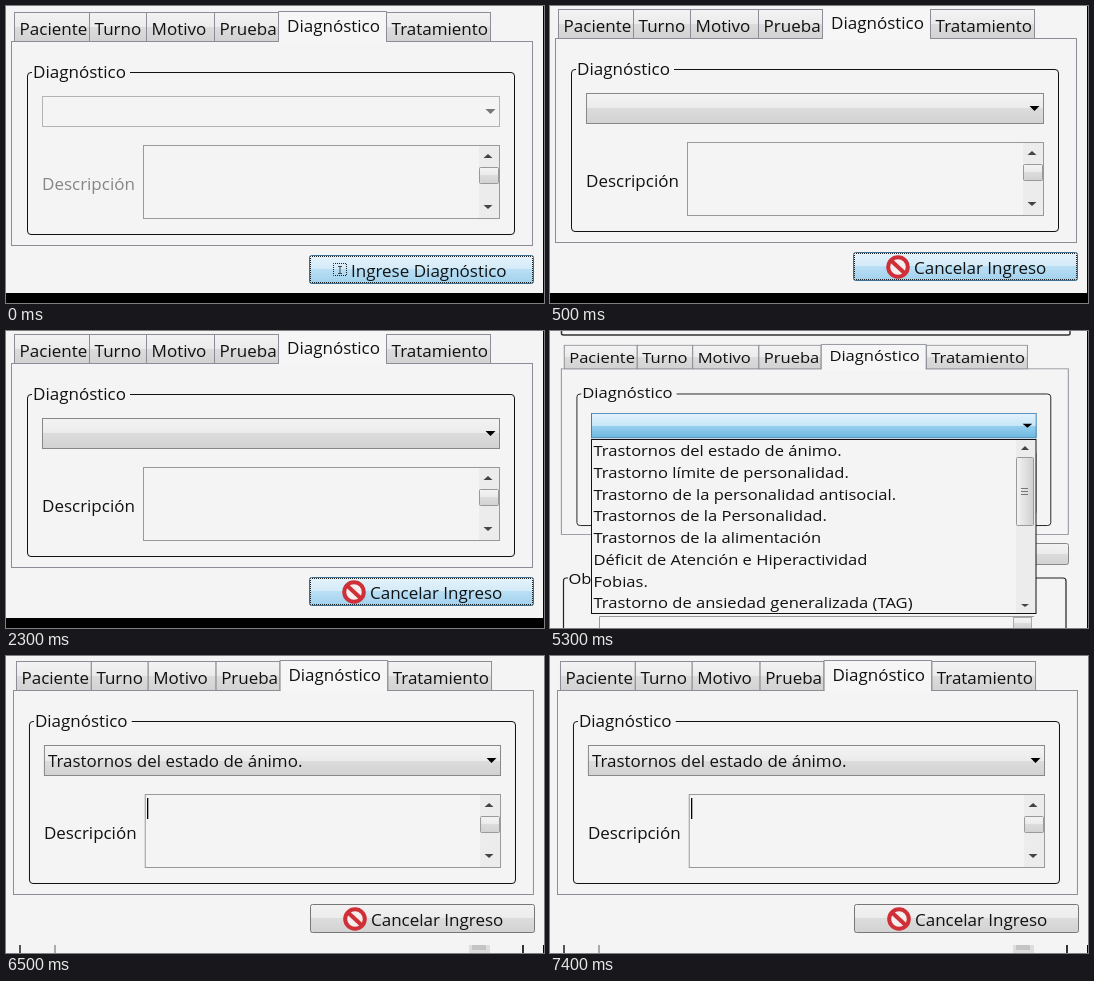
These frames come from a looping animation (538 by 297 pixels, 8000 ms). An HTML page:

```html
<!DOCTYPE html>
<html lang="es">
<head>
<meta charset="utf-8">
<style>
html, body { margin: 0; width: 100%; height: 100%; overflow: hidden; background: #f4f4f4; }
svg { display: block; width: 538px; height: 297px; }
text { font: 17px "Open Sans", "Noto Sans", sans-serif; white-space: pre; }
</style>
</head>
<body>
<svg id="stage" viewBox="0 0 538 297"></svg>
<script>
const stage = document.getElementById('stage');
const BG = '#f4f4f4';

const box = (x, y, w, h, fill, stroke = 'none', r = 0) =>
  `<rect x="${x}" y="${y}" width="${w}" height="${h}" rx="${r}" fill="${fill}" stroke="${stroke}"/>`;
const dotted = (x, y, w, h) =>
  `<rect x="${x}" y="${y}" width="${w}" height="${h}" fill="none" stroke="#222" stroke-dasharray="1" stroke-dashoffset=".5"/>`;
const path = (d, stroke, width = 1) =>
  `<path d="${d}" fill="none" stroke="${stroke}" stroke-width="${width}"/>`;
const label = (x, y, s, fill = '#111') => `<text x="${x}" y="${y}" fill="${fill}">${s}</text>`;
const arrow = (x, y, w, h, fill = '#444') => `<path d="M${x - w} ${y}h${2 * w}l${-w} ${h}z" fill="${fill}"/>`;
const group = (transform, ...parts) => `<g transform="${transform}">${parts.join('')}</g>`;
const gradient = (id, ...colors) => `<linearGradient id="${id}" x2="0" y2="1">${
  colors.map((c, i) => `<stop offset="${[0, .5, .5, 1][i]}" stop-color="${c}"/>`).join('')}</linearGradient>`;

const tabs = [['Paciente', 8, 83], ['Turno', 83, 140], ['Motivo', 140, 208],
  ['Prueba', 208, 272], ['Tratamiento', 380, 484]];

const tabBar = edgeColor =>
  box(5.5, 35.5, 521, 204, BG, '#8b8e96') +
  tabs.map(([name, x, end]) => box(x + .5, 6.5, end - x, 29, 'url(#gray)', '#8b8e96') +
    label(x + 5.6, 28.6, name)).join('') +
  box(273, 5, 107, 32, '#f6f6f6') + path('M272.5 36V5.5H380.5V36', edgeColor) +
  label(281, 26, 'Diagnóstico');

const scrollBar = () =>
  box(473, 140, 20, 72, '#ececec') + arrow(482, 152, 4.5, -4) + arrow(482, 199, 4.5, 4) +
  box(473.5, 161.5, 19, 16, 'url(#gray)', '#999', 1);

function form({ combo, border, disabled, value = '', tabEdge = '#8b8e96' }) {
  const ink = disabled ? '#858585' : '#111';
  return tabBar(tabEdge) +
    path('M26 66.5h-1q-3.5 0-3.5 3.5V225q0 3.5 3.5 3.5H505q3.5 0 3.5-3.5V70q0-3.5-3.5-3.5H124', '#111') +
    label(27, 72, 'Diagnóstico') +
    box(36.5, 90.5, 457, 30, combo, border) +
    arrow(484.5, 103, 5, 5, disabled ? '#777' : '#000') + label(40, 112.5, value) +
    label(36, 184, 'Descripción', ink) +
    box(137.5, 139.5, 356, 73, BG, '#999') + scrollBar();
}

const button = (fill, border, focused) =>
  box(303.5, 249.5, 224, 28, fill, border, 2) + (focused ? dotted(304.5, 250.5, 222, 26) : '');

const insertFace = () =>
  dotted(327.5, 257.5, 13, 12) +
  path('M332 260.5h4M334 260.5v7M332 267.5h4', '#444') + label(345, 271, 'Ingrese Diagnóstico');
const cancelFace = () =>
  `<circle cx="348" cy="264" r="9.5" fill="#f6eeee"/>` +
  path('M341 257.5l14 13', '#cf2f36', 4) +
  `<circle cx="348" cy="264" r="9.8" fill="none" stroke="#cf2f36" stroke-width="4"/>` +
  label(364, 271, 'Cancelar Ingreso');

const bottomBar = box(0, 287, 538, 10, '#000');
const edge = box(537, 0, 1, 297, '#000');

const options = ['Trastornos del estado de ánimo.', 'Trastorno límite de personalidad.',
  'Trastorno de la personalidad antisocial.', 'Trastornos de la Personalidad.',
  'Trastornos de la alimentación', 'Déficit de Atención e Hiperactividad',
  'Fobias.', 'Trastorno de ansiedad generalizada (TAG)'];

const SHRINK = 'scale(.973 .812)';

const dropDown = () =>
  box(41.5, 108.5, 444.5, 174, BG, '#111') +
  box(466, 109, 19, 173, '#ececec') +
  box(466.5, 126.5, 17, 68, 'url(#side)', '#999', 1) +
  path('M471 157.5h7M471 160.5h7M471 163.5h7', '#777') +
  arrow(475, 119, 4, -4) + arrow(475, 273, 4, 3) +
  group('translate(43.5 125) ' + SHRINK, ...options.map((s, i) => label(0, i * 26.8, s)));

// Parts of the page around the open list
const surroundings = () =>
  path('M11.5 0v2.5q0 1.5 2 1.5H518q2 0 2-1.5V0', '#333', 1.5) +
  box(300.5, 212.5, 218, 21, 'url(#gray)', '#888', 2) +
  path('M18 247h-2q-2.5 0-2.5 3V297M44 247H513q3 0 3 3V297', '#222', 1.2) +
  group('translate(18.5 253) ' + SHRINK, label(0, 0, 'Ob')) +
  path('M49.5 297V285.5H484', '#999') + box(463.5, 286.5, 18, 11, 'url(#gray)', '#aaa');

const footer = () =>
  box(13, 289, 2, 8, '#555') + box(48, 289, 2, 8, '#aaa') +
  box(463, 289, 21, 8, '#ddd') + box(466, 289, 14, 5, '#c4c4c4') + box(516, 289, 2, 8, '#333') +
  box(537, 289, 1, 8, '#000');

// [end time in ms, artwork]
const scenes = [
  [500, form({ combo: BG, border: '#b4b4b4', disabled: true }) +
    button('url(#blue)', '#3c6f91', true) + insertFace() + bottomBar + edge],
  [3500, group('translate(0 -3)', form({ combo: 'url(#gray)', border: '#888', tabEdge: 'none' }),
    button('url(#blue)', '#3c6f91', true), cancelFace()) + bottomBar + edge],
  [6500, surroundings() + group('translate(6 9) ' + SHRINK,
    form({ combo: 'url(#open)', border: '#3c7fb1' })) + dropDown() + edge],
  [8000, group('translate(2 -1) scale(.998 1)',
    form({ combo: 'url(#gray)', border: '#888', value: options[0] })) + box(141, 142, 1.3, 21, '#000') +
    group('translate(1 -1)', button('url(#gray)', '#777'), cancelFace()) + footer()]
];

stage.innerHTML = `<defs>${gradient('gray', '#f3f3f3', '#ebebeb', '#dcdcdc', '#d2d2d2')}
  ${gradient('blue', '#e5f3fb', '#d3eaf8', '#b9dff5', '#a2d1ec')}
  ${gradient('open', '#e3f3fc', '#c6e6f8', '#98d1ef', '#6bb6de')}
  <linearGradient id="side"><stop stop-color="#f3f3f3"/><stop offset="1" stop-color="#cfcfcf"/></linearGradient></defs>` +
  box(0, 0, 538, 297, BG) + scenes.map(([, art]) => `<g>${art}</g>`).join('');
const layers = stage.querySelectorAll('#stage > g');

function draw(now) {
  const time = now % 8000;
  const current = scenes.findIndex(([end]) => time < end);
  layers.forEach((layer, i) => layer.style.display = i === current ? '' : 'none');
  requestAnimationFrame(draw);
}
draw(performance.now());
</script>
</body>
</html>
```
